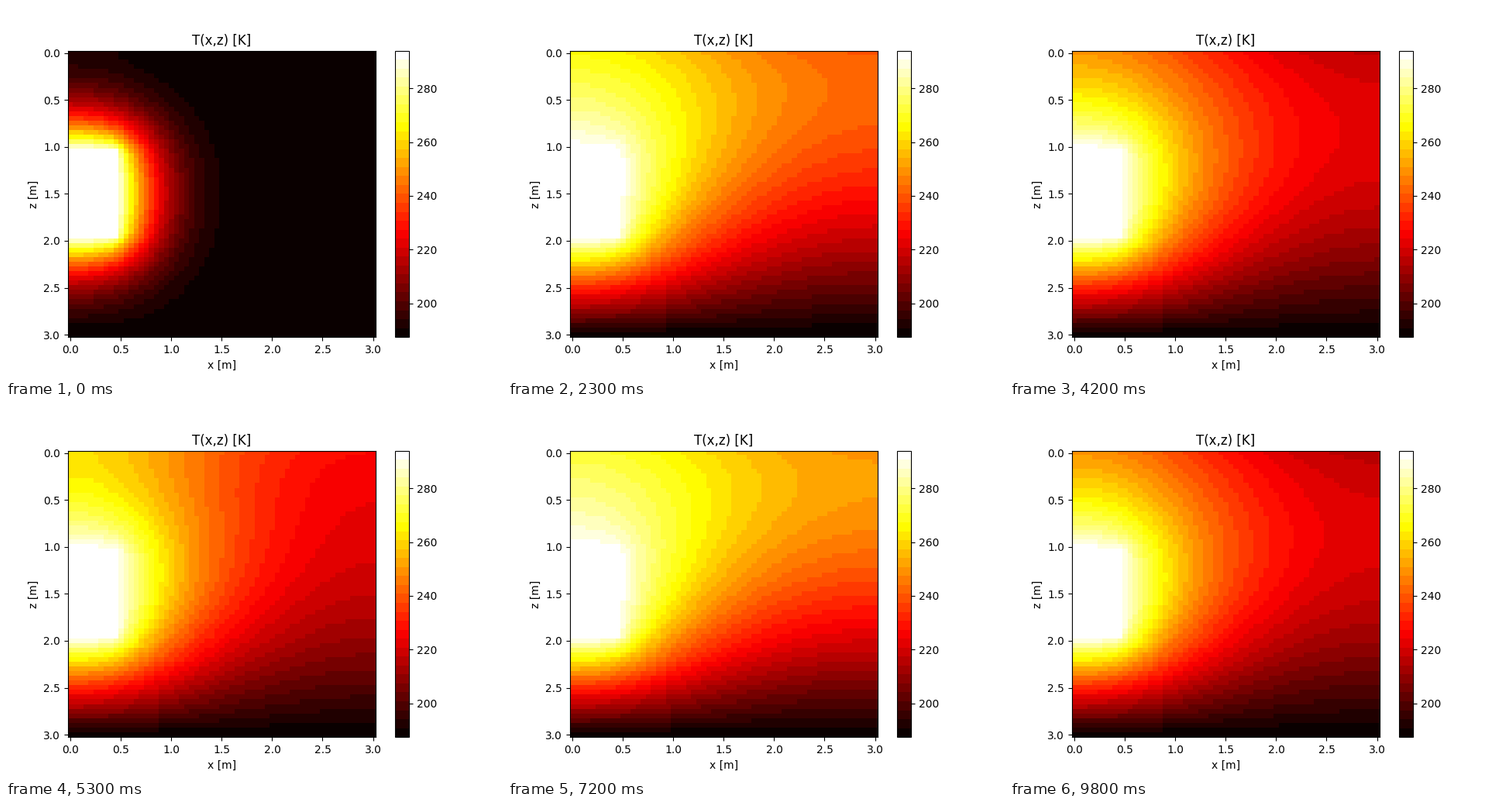
Write a matplotlib script that moves like this. It is 640 px wide and 480 px high and loops after 9900 ms.

```python
import numpy as np
import matplotlib.pyplot as plt
from matplotlib.animation import FuncAnimation

FRAMES = 99
PERIOD = 50          # frames in one light/dark cycle
N = 61               # grid nodes per side
DX = 0.05            # node spacing in m
DIFFUSIVITY = 0.125  # m^2 per frame
SUBSTEPS = 240
SUN = 55.0           # peak surface heating, K/m
RADIATION = 6.2e-9   # surface cooling, K/m per K^4
T_COLD, T_BOX = 187.4, 294.1


def simulate():
    """Heat spreading from a warm box below a sunlit, radiating surface."""
    # One ghost row on top and one ghost column on each side.
    u = np.full((N + 1, N + 2), T_COLD)
    box = (slice(22, 41), slice(1, 11))
    u[box] = T_BOX
    rate = DIFFUSIVITY / SUBSTEPS / DX**2
    history = []
    for frame in range(FRAMES):
        for step in range(SUBSTEPS):
            t = frame + step / SUBSTEPS
            sun = SUN * max(0.0, np.sin(2 * np.pi * t / PERIOD))
            u[0] = u[2] + 2 * DX * (sun - RADIATION * u[1]**4)
            u[:, 0] = u[:, 2]
            u[:, -1] = u[:, -3]
            mid = u[1:-1, 1:-1]
            mid += rate * (u[:-2, 1:-1] + u[2:, 1:-1]
                           + u[1:-1, :-2] + u[1:-1, 2:] - 4 * mid)
            u[box] = T_BOX
        history.append(u[1:, 1:-1].copy())
    return history


history = simulate()

plt.rcParams["font.family"] = "DejaVu Sans"
fig, ax = plt.subplots(figsize=(6.4, 4.8), dpi=100)
low, high = -DX / 2, 3 + DX / 2
image = ax.imshow(history[0], cmap=plt.get_cmap("hot", 32),
                  vmin=T_COLD, vmax=T_BOX, aspect="auto",
                  interpolation="nearest", extent=(low, high, high, low))
fig.colorbar(image, ax=ax)
ax.set_title("T(x,z) [K]")
ax.set_xlabel("x [m]")
ax.set_ylabel("z [m]")


def draw(frame):
    image.set_data(history[frame])
    return [image]


anim = FuncAnimation(fig, draw, frames=FRAMES, interval=100, repeat=True)
plt.show()
```
